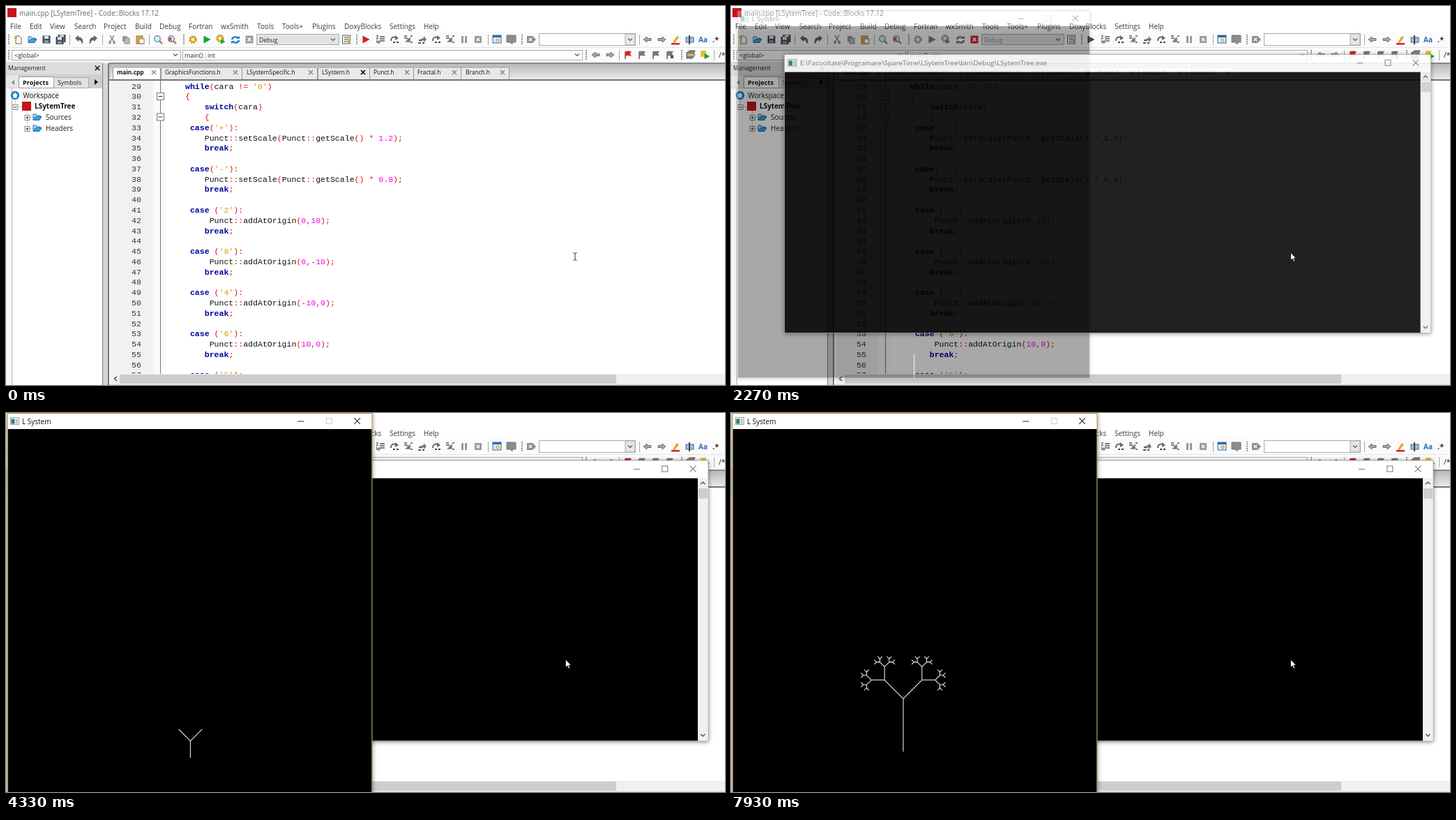
An HTML page for the animation above (8 s loop, 1031 px wide and 543 px high).

```html
<!DOCTYPE html>
<html lang="en">
<head>
<meta charset="utf-8">
<title>L System</title>
<style>
html, body { margin: 0; width: 100%; height: 100%; overflow: hidden; background: #fff; }
svg { display: block; width: 100vw; height: 100vh; font-family: "Open Sans", sans-serif; }
text { white-space: pre; }
.code { font-family: "Liberation Mono", monospace; font-size: 11.55px; }
.win { filter: drop-shadow(0 1px 3px rgba(0, 0, 0, .45)); }
.busy .tool { filter: grayscale(1); }
.busy #config { fill: #8a8a8a; }
.busy #stop { fill: #d8202c; }
</style>
</head>
<body>
<svg id="stage" viewBox="0 0 1031 543" preserveAspectRatio="none"></svg>
<script>
const stage = document.getElementById('stage');
const rect = (x, y, w, h, fill, more = '') =>
  `<rect x="${x}" y="${y}" width="${w}" height="${h}" fill="${fill}" ${more}/>`;
const path = (d, stroke, fill = 'none', w = 1, more = '') =>
  `<path d="${d}" stroke="${stroke}" fill="${fill}" stroke-width="${w}" ${more}/>`;
const esc = s => s.replace(/&/g, '&amp;').replace(/</g, '&lt;');
const text = (x, y, s, size = 10, fill = '#222', more = '') =>
  `<text x="${x}" y="${y}" font-size="${size}" fill="${fill}" ${more}>${esc(s)}</text>`;
const at = (x, y, s, more = '') => `<g transform="translate(${x} ${y})" ${more}>${s}</g>`;
const cross = (x, y, r, color, w = 1) =>
  path(`M${x - r} ${y - r}l${2 * r} ${2 * r}m0 ${-2 * r}l${-2 * r} ${2 * r}`, color, 'none', w);
const chevron = (x, y, color = '#555') => path(`M${x - 3} ${y - 1.5}l3 3l3-3`, color, 'none', 1.2);
const grip = (x, y) => path(`M${x} ${y - 7}v15`, '#777', 'none', 2, 'stroke-dasharray="1.5 1.5"');
const bar = (x, y) => rect(x, y - 7, 1, 15, '#a8a8a8');
const BOLD = 'font-weight="700"';

// small toolbar pictures, centred on 0,0
const icon = {
  page: path('M-4-5h5l3 3v8h-8z', '#666', '#fff') + rect(-6, -5, 4, 4, '#f0b020'),
  folder: path('M-6 4v-8h4l1 2h5v2', '#1f6fae', '#bfe0f5') + path('M-6 4.5l3-5h9l-3 5z', '#1f6fae', '#3ba0dc'),
  save: rect(-5.5, -5.5, 11, 11, '#444b57') + rect(-3, -5, 6, 4, '#dfe5ee') + rect(-3, 1, 6, 4, '#8793a5'),
  undo: path('M-6-2l5-4v2.5q7 0 6.500 8.500l-2 1q0-5-4.500-5v2.500z', 'none', '#666'),
  cut: path('M-3-6l5 8M3-6l-5 8', '#777', 'none', 1.4) + path('M-4 2.5h2v3h-2zM2 2.5h2v3h-2z', '#777', 'none', 1.2),
  copy: rect(-5, -5, 7, 8, '#999') + rect(-2, -2, 7, 8, '#b9b9b9', 'stroke="#888"'),
  paste: rect(-5, -5, 9, 11, '#e3aa45', 'stroke="#9a7430"') + rect(-1, -1, 7, 7, '#fff', 'stroke="#777"'),
  find: path('M1 1l5 5', '#b07b2c', 'none', 2.4) + '<circle cx="-1" cy="-1" r="4.3" fill="#d7edfa" stroke="#5d83a5" stroke-width="1.3"/>',
  gear: '<circle r="4" fill="#fff3c0" stroke="#c99a10" stroke-width="3.4" stroke-dasharray="2.4 .8"/>',
  play: path('M-4.5-5.5l10 5.5l-10 5.5z', 'none', '#12a52b'),
  cycle: path('M-5 0a5 4 0 0 1 9-2M5 1a5 4 0 0 1-9 2', '#2382cf', 'none', 2.4) + path('M1-1h5v-4zM-1 2h-5v4z', 'none', '#2382cf'),
  next: path('M-6-5h3M-6-2h3M-1-4h7M-1-1h7M-1 2h7', '#555', 'none', 1.4) + path('M-5-2v4h2v-2l3 4l-3 3v-2h-3v-5', 'none', '#888'),
  over: path('M-5 2q0-7 8-5', '#666', 'none', 2) + path('M1-6l5 4l-5 3z', 'none', '#666') + path('M-2 4h3M3 4h3', '#444', 'none', 2),
  into: path('M-6-5h4M-6-2h4M3-5h3M3 4h3', '#555', 'none', 1.7) + path('M-3-3l4 4M2-2v5h-5z', '#777', '#777', 1.5),
  out: path('M-6 5h4M0 5h3M-5 1h3', '#555', 'none', 2) + path('M-3 3q0-5 5-5v-3l4 5l-4 4v-3z', 'none', '#777'),
  pause: path('M-2.5-5v10M2.5-5v10', '#999', 'none', 3),
  off: rect(-5, -5, 10, 10, '#999', 'rx="1"') + cross(0, 0, 2.3, '#fff', 1.5),
  left: path('M-6 0l5-4v2.5h6v3h-6v2.5z', '#555', '#aaa', .8),
  flag: path('M-4-5v11', '#555', 'none', 1.4) + path('M-4-5q4-1 9 0l-2 3l2 4q-5-2-9 0z', 'none', 'currentColor'),
};
const put = (name, x, y = 48, more = '') => at(x, y, icon[name], more);
const flip = (name, x, y = 48) => `<g transform="translate(${x} ${y}) scale(-1 1)">${icon[name]}</g>`;
const combo = (x, y, w, h, fill = '#fff') => rect(x + .5, y + .5, w, h, fill, 'stroke="#aaa"');

function menuAndTools() {
  const menu = { File: 6, Edit: 34, View: 63, Search: 98, Project: 140, Build: 185, Debug: 220, Fortran: 262,
    wxSmith: 308, Tools: 360, 'Tools+': 396, Plugins: 439, DoxyBlocks: 485, Settings: 550, Help: 599 };
  let s = rect(2, 3, 13, 13, '#c4161c') + text(19, 13.5, 'main.cpp [LSytemTree] - Code::Blocks 17.12', 9.9, '#666');
  for (const m in menu) s += text(menu[m], 32.5, m, 10, '#3c3c3c');
  s += rect(0, 37, 1031, 44, '#fbfbfb') + rect(0, 59, 1031, 1, '#e4e4e4');
  s += [4, 255, 503, 740].map(x => grip(x, 48)).join('') + [4, 832, 969].map(x => grip(x, 70)).join('');
  s += [91, 138, 205, 691, 908].map(x => bar(x, 48)).join('') + [879, 1015].map(x => bar(x, 70)).join('');
  s += put('page', 18) + put('folder', 38) + put('save', 58) + put('save', 80, 46.5) + put('save', 77, 49.5);
  s += put('undo', 105) + flip('undo', 125) + put('cut', 152) + put('copy', 172) + put('paste', 192);
  s += put('find', 218) + put('find', 238) + text(233, 51, 'R', 8, '#c81e1e', BOLD);
  s += `<g class="tool">${put('gear', 268) + put('play', 288) + put('gear', 307, 46.5)
    + at(311, 51, `<g transform="scale(.65)">${icon.play}</g>`) + put('cycle', 329)}</g>`;
  s += `<rect id="stop" x="343.5" y="42.5" width="11" height="11" rx="1" fill="#9a9a9a"/>` + cross(349, 48, 2.5, '#fff', 1.7);
  s += combo(359, 40, 118, 15, '#e3e3e3') + text(363, 51.5, 'Debug', 8.6, '#222', 'id="config"') + chevron(469, 48);
  s += `<g class="tool">${rect(482.5, 42, 11, 12, '#eee', 'stroke="#666"')
    + path('M485 45h7M485 48h7M485 51h4', '#555') + rect(490, 49, 4, 4, '#e0a81c')
    + at(516, 48, path('M-4.5-5.5l10 5.5l-10 5.5z', 'none', '#d41f1f'))}</g>`;
  s += put('next', 537) + put('over', 557) + put('into', 577) + put('out', 597) + put('over', 617) + put('into', 637);
  s += put('pause', 657) + put('off', 677);
  s += rect(698, 42, 12, 11, '#dcebf8', 'stroke="#2c6ab0"') + rect(698, 42, 12, 3, '#2c6ab0') + at(705, 49, `<g transform="scale(.45)">${icon.gear}</g>`);
  s += path('M718 42h13v10h-5v3l-3-3h-5z', '#777', '#8c8c8c');
  s += path('M747 43h8l5 5l-5 5h-8z', 'none', '#8b8b8b') + cross(752, 48, 2.3, '#fff', 1.4);
  s += combo(764, 39, 138, 17) + rect(888, 40, 14, 16, '#e6e6e6', 'stroke="#aaa"') + chevron(895, 48);
  s += put('left', 920) + flip('left', 940) + path('M956 52l6-9l3 2l-6 8z', 'none', '#e8a42c') + rect(954, 53, 12, 2.5, '#d32424');
  s += rect(975, 45, 11, 7, '#9fbfe0', 'stroke="#47698d"') + rect(979, 42, 2, 13, '#444');
  s += text(993, 52, 'Aa', 10, '#2b6cb4', BOLD) + text(1013, 52, '.*', 11, '#333', BOLD);
  // second row
  s += combo(8, 63, 242, 14) + text(12, 73.5, '<global>', 9) + chevron(243, 70);
  s += combo(253, 63, 573, 14) + text(256, 73.5, 'main() : int', 8.9) + chevron(819, 70);
  s += put('left', 846, 70) + flip('left', 866, 70) + put('flag', 892, 70, 'color="#dc2020"');
  s += [912, 932, 952].map(x => put('flag', x, 70, 'color="#777"')).join('') + cross(955, 73, 2, '#222', 1.4);
  s += path('M976 67l4-3h8l-2 4l2 2l-4 5h-8z', '#555', '#8d8573') + rect(977, 69, 10, 2, '#d8c9a0');
  s += rect(996, 64, 8, 9, '#e8bf3b') + at(1005, 72, `<g transform="scale(.75)">${icon.play}</g>`);
  return s + text(1022, 74, '/*', 10.5, '#222');
}

function sidebar() {
  let s = rect(0, 80, 148, 463, '#f6f6f6') + rect(0, 80, 139, 18, '#dcdcdc') + text(3, 92, 'Management', 8.7) + cross(131, 89, 3.3, '#111', 1.5);
  s += rect(0, 98, 139, 20, '#cfcfcf') + rect(0, 99, 18, 18, '#e6e6e6') + path('M12 106v7l-4-3.5z', 'none', '#888');
  s += rect(18.5, 101.5, 50, 16, '#fff', 'stroke="#999"') + text(24, 113, 'Projects', 9.2, '#111', BOLD);
  s += rect(68.5, 102.5, 50, 15, '#e2e2e2', 'stroke="#aaa"') + text(74, 113, 'Symbols', 8.7) + path('M127 105v8l5-4z', 'none', '#111');
  s += rect(8, 118, 130, 425, '#fff') + rect(8, 118, 1, 425, '#b0b0b0');
  s += rect(138, 82, 1.5, 461, '#858585') + rect(139.5, 82, 7, 461, '#d6d6d6') + rect(146, 82, 2.5, 461, '#777');
  s += '<circle cx="13" cy="128" r="6.2" fill="#1786c9"/>' + path('M9 128l4-4l4 4h-1.5v3.5h-5V128z', 'none', '#fff');
  s += rect(22, 122, 54, 12, '#f0f0f0') + text(24.5, 131.5, 'Workspace') + rect(23, 137, 13, 13, '#c4161c') + text(41, 147.3, 'LSytemTree', 10, '#111', BOLD);
  s += path('M13.5 135v8M18 144.5h5M30.5 150v25M34 159.5h5M34 175.5h5', '#999', 'none', 1, 'stroke-dasharray="1 1"');
  const box = (x, y, d) => rect(x - 3.5, y - 3.5, 7, 7, '#fff', 'stroke="#888"') + path(`M${x - 2} ${y}h4${d}`, '#333');
  s += box(13.5, 145, '') + box(30.5, 160, 'm-2-2v4') + box(30.5, 176, 'm-2-2v4');
  return s + put('folder', 45, 159) + put('folder', 45, 175) + text(57, 163, 'Sources') + text(57, 179, 'Headers');
}

function tabs() {
  const list = [['main.cpp', 153, 159, 212], ['GraphicsFunctions.h', 222, 228, 329], ['LSystemSpecific.h', 338, 345, 437],
    ['LSystem.h', 447, 453, 512], ['Punct.h', 521, 527, 575], ['Fractal.h', 584, 590, 643], ['Branch.h', 652, 659, 712]];
  let s = rect(148, 81, 883, 26, 'url(#strip)') + rect(148, 81, 883, 2, '#8a8a8a') + rect(148, 105, 883, 2.2, '#777');
  list.forEach(([name, x, tx, cx], i) => {
    s += path(`M${x + .5} 105v-15q0-2 2-2h${cx + 5 - x}q2 0 2 2v15`, '#999', i ? '#e9e9e9' : '#fff');
    s += text(tx, 97.7, name, 8.4, '#111', i ? '' : BOLD) + cross(cx, 95, 3, i == 3 ? '#000' : '#777', i == 3 ? 1.6 : 1.1);
  });
  return s;
}

function codeLine(src) {
  const colors = ['#00009c', '#dc9a00', '#f000f0', '#111', '#111', '#e01010'];
  return src.replace(/(while|switch|case|break)|('.')|(\d[\d.]*)|([A-Za-z]+)|(\s+)|(.)/g, (m, ...g) => {
    const kind = g.slice(0, 6).findIndex(v => v !== undefined);
    return `<tspan fill="${colors[kind]}"${kind ? '' : ' ' + BOLD}>${m}</tspan>`;
  });
}

function editor() {
  const lines = [[0, "while(cara != '0')"], [0, '{'], [4, 'switch(cara)'], [4, '{']];
  const add = (label, col, call) => lines.push([1, `case${label}:`], [col, call], [4, 'break;'], [0, '']);
  [['+', '1.2'], ['-', '0.8']].forEach(([k, f]) => add(`('${k}')`, 4, `Punct::setScale(Punct::getScale() * ${f});`));
  [['2', '0,10'], ['8', '0,-10'], ['4', '-10,0'], ['6', '10,0']].forEach(([k, p]) => add(` ('${k}')`, 5, `Punct::addAtOrigin(${p});`));
  lines.push([1, "case ('5'):"]);
  let s = rect(148, 107, 883, 436, '#fff') + rect(150, 107, 61, 420, '#f1f1f1') + rect(211, 107, 17, 420, '#fafafa');
  s += '<g class="code" clip-path="url(#page)">';
  lines.forEach(([col, src], i) => {
    const y = 118.6 + i * 14.78;
    s += `<text x="180" y="${y}" fill="#333">${29 + i}</text><text x="${257 + col * 6.93}" y="${y}">${codeLine(src)}</text>`;
  });
  s += '</g>' + rect(221, 107, 1, 420, '#777');
  [129.5, 159].forEach(y => s += rect(216.5, y - 5, 10, 10, '#fff', 'stroke="#777"') + path(`M218.5 ${y}h6`, '#333'));
  s += rect(150, 527, 881, 15, '#f0f0f0') + rect(163, 528, 712, 13, '#cdcdcd') + path('M159 531l-3.5 3l3.5 3', '#444', 'none', 1.4);
  return s + rect(148, 542, 883, 1, '#dadada') + rect(339.5, 344, 1.2, 15, '#000', 'id="caret"');
}

const appIcon = (x, y) => rect(x, y, 12, 10, '#eef3f5', 'stroke="#8a9499" stroke-width=".8"') + rect(x + 1, y + 2, 5, 7, '#2f8077') + rect(x + 7.5, y + 2, 3, 7, '#b9cbd2');
const buttons = (x, y, gap, color, box) => path(`M${x - 4.5} ${y + .5}h9`, color) + rect(x + gap - 4, y - 4, 8, 8, 'none', `stroke="${box}"`) + cross(x + 2 * gap, y, 4.3, color, 1.1);

const consoleWin = rect(73.4, 68, 933.6, 402, '#fff', 'id="consoleEdge" stroke-width=".8"')
  + appIcon(79, 75) + text(96, 84, 'E:\\Facooltate\\Programare\\SpareTime\\LSytemTree\\bin\\Debug\\LSytemTree.exe', 9.92, '#777')
  + buttons(904.5, 80, 40.3, '#777', '#777') + rect(74, 93.5, 918, 376, '#000')
  + rect(992, 93.5, 14.5, 376, '#f0f0f0') + rect(993, 108, 13, 14.5, '#cdcdcd')
  + path('M996 102l3.2-3.2l3.2 3.2M996 460l3.2 3.2l3.2-3.2', '#444', 'none', 1.3);
const glWin = rect(2, .5, 523, 544.5, '#fff', 'id="glEdge"') + appIcon(6.5, 6.5) + text(23, 15.7, 'L System', 10, '#111')
  + buttons(422.8, 11.5, 40.4, '#222', '#ccc') + rect(2.8, 23, 521.6, 521.5, '#000') + path('', '#eee', 'none', 1.05, 'id="tree"');

stage.innerHTML = `<defs><linearGradient id="strip" x2="0" y2="1"><stop stop-color="#b4b4b4"/><stop offset="1" stop-color="#eee"/></linearGradient>
  <clipPath id="page">${rect(148, 107, 883, 420, '#fff')}</clipPath></defs>`
  + rect(0, 0, 1031, 543, '#fff') + menuAndTools() + sidebar() + tabs() + editor()
  + `<g id="console" class="win">${consoleWin}</g><g id="gl" class="win">${glWin}</g>`
  + path('M813.5 353.5q2 0 2.5 1.5q.5-1.5 2.5-1.5M816 354.5v9M813.5 364.5q2 0 2.5-1.5q.5 1.5 2.5 1.5', '#333', 'none', 1, 'id="beam"')
  + path('M802.4 353v11.5l2.6-2.4l1.9 4.2l1.9-.9l-1.9-4h3.5z', '#111', '#fff', .9, 'id="arrow"');

const el = {};
['caret', 'consoleEdge', 'glEdge', 'console', 'gl', 'tree', 'beam', 'arrow']
  .forEach(id => el[id] = document.getElementById(id));

// time, generation, shift right, shift down
const poses = [[0, 0, 0, 6], [3467, 0, 0, 5], [3600, 0, 0, 4], [3867, 0, 0, 2], [4067, 0, 0, 1], [4200, 0, 0, 0],
  [4333, 1, 0, 0], [4533, 2, 0, 0], [4733, 3, 0, 0], [4933, 4, 0, 0], [5133, 5, 0, 0],
  [5867, 5, 0, 1], [6067, 5, 0, 2], [6200, 5, 0, 3], [6333, 5, 0, 4],
  [6533, 5, 0, 3], [6667, 5, 0, 2], [6800, 5, 0, 1], [6933, 5, 0, 0], [7067, 5, 0, -1],
  [7267, 5, -1, -1], [7467, 5, -2, -1], [7733, 5, -3, -1], [7933, 5, -2, -1]];

// each generation doubles old segments and shrinks the unit to two thirds
function treePath(gen, x0, y0) {
  const unit = 36 * (2 / 3) ** gen;
  let d = '';
  const grow = (x, y, angle, level) => {
    const len = unit * Math.max(1, 2 ** (gen - 1 - level));
    const x2 = x + len * Math.sin(angle), y2 = y - len * Math.cos(angle);
    d += `M${x.toFixed(2)} ${Math.min(y, 544).toFixed(2)}L${x2.toFixed(2)} ${y2.toFixed(2)}`;
    if (level < gen) for (const turn of [-1, 1]) grow(x2, y2, angle + turn * Math.PI / 4, level + 1);
  };
  grow(x0, y0, 0, 0);
  return d;
}

function openWin(node, t, start, cx, cy) {
  const a = Math.min(1, Math.max(0, (t - start) / 265)), s = .949 + .051 * a;
  show(node, a);
  node.setAttribute('opacity', a);
  node.setAttribute('transform', `translate(${cx * (1 - s)} ${cy * (1 - s)}) scale(${s})`);
}

const show = (node, on) => { node.style.display = on ? '' : 'none'; };
const STEP = 1000 / 15;
let last = -1;

function draw(ms) {
  const k = Math.floor((ms % 8000 + 4) / STEP) % 120;
  if (k === last) return;
  last = k;
  const t = k * STEP;
  stage.classList.toggle('busy', k >= 1);
  show(el.beam, k < 1);
  show(el.arrow, k >= 1);
  show(el.caret, k >= 3 && k < 10);
  openWin(el.console, t, 2037, 520, 264);
  openWin(el.gl, t, 2177, 214, 194);
  // the drawing window opens behind the console, then is raised
  const raised = k >= 36;
  (raised ? el.beam : el.console).before(el.gl);
  el.glEdge.setAttribute('stroke', raised ? '#b88a3c' : '#bbb');
  el.consoleEdge.setAttribute('stroke', t < 2190 ? '#c9a36a' : '#999');
  const [, gen, dx, dy] = poses.filter(p => p[0] <= t + 2).pop();
  el.tree.setAttribute('d', treePath(gen, 264.4 + dx * 8.7, 493.9 + dy * 8.7));
}

const begin = performance.now();
function loop() {
  draw(performance.now() - begin);
  requestAnimationFrame(loop);
}
loop();
</script>
</body>
</html>
```
